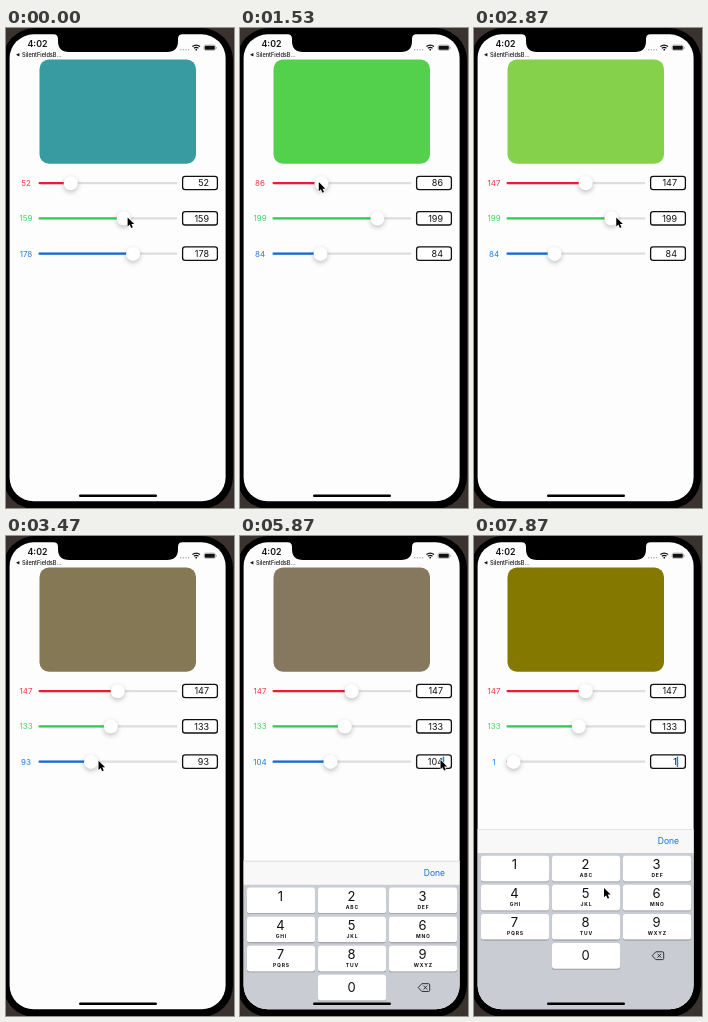
An HTML page with a canvas that plays this animation: 228x480 px, repeating every 8000 ms.

```html
<!DOCTYPE html>
<html lang="en">
<head>
<meta charset="utf-8">
<title>Colour sliders</title>
<style>
  html, body { margin: 0; width: 100%; height: 100%; overflow: hidden; background: #3a322e; }
  canvas { display: block; width: 100vw; height: 100vh; }
</style>
</head>
<body>
<canvas id="stage"></canvas>
<script>
const LOOP = 8000, W = 228, H = 480;
const INK = '#111';
const canvas = document.getElementById('stage');
const ctx = canvas.getContext('2d');
const ratio = window.devicePixelRatio || 1;
canvas.width = W * ratio;
canvas.height = H * ratio;

const red = { y: 155.1, value: 52, track: '#f01c30', label: '#ee3a49' };
const green = { y: 190.4, value: 159, track: '#36cc58', label: '#48d269' };
const blue = { y: 225.7, value: 178, track: '#106cdc', label: '#1f7fdc' };
const sliders = [red, green, blue];

// grip: how far right of the thumb's centre the pointer holds it
const drags = [
  { slider: green, start: 70, end: 270, to: 199, grip: 4 },
  { slider: blue, start: 400, end: 700, to: 84, grip: -0.5 },
  { slider: red, start: 1250, end: 2070, to: 151, grip: -2.7 },
  { slider: red, start: 2070, end: 2200, to: 147, grip: -2.7 },
  { slider: green, start: 2870, end: 3120, to: 133, grip: 5 },
  { slider: blue, start: 3310, end: 3665, to: 104, grip: 7.5 }
];
const deletions = [6930, 7400];
const KEYBOARD_START = 5660, KEYBOARD_TIME = 480;

const clamp01 = p => Math.min(1, Math.max(0, p));
const mix = (a, b, p) => a + (b - a) * p;
const thumbX = value => 39 + value * 0.4945;

function valueAt(slider, t) {
  let value = slider.value;
  for (const { slider: target, start, end, to } of drags) {
    if (target === slider) value = mix(value, to, clamp01((t - start) / (end - start)));
  }
  value = Math.round(value);
  if (slider === blue) {
    for (const time of deletions) if (t >= time) value = Math.floor(value / 10);
  }
  return value;
}

// The pointer settles shortly before each drag, then visits the field and the delete key.
const stops = drags.flatMap(({ slider, start, end, grip }) => {
  const stop = (time, at) => ({ time, x: thumbX(valueAt(slider, at)) + grip, y: slider.y - 1 });
  return [stop(start - 70, start), stop(start, start), stop(end, end)];
}).concat(
  { time: 4200, x: 200.5, y: 224 }, { time: 5950, x: 200.5, y: 224 },
  { time: 6530, x: 196, y: 429.5 }, { time: 7440, x: 196, y: 429.5 },
  { time: 7870, x: 130, y: 352 }
);

function pointerAt(t) {
  const next = stops.findIndex(stop => stop.time > t);
  if (next < 0) return stops[stops.length - 1];
  const a = stops[Math.max(0, next - 1)], b = stops[next];
  const p = clamp01((t - a.time) / (b.time - a.time));
  return { x: mix(a.x, b.x, p), y: mix(a.y, b.y, p) };
}

function swatchColor(t) {
  const [r, g, b] = sliders.map(slider => valueAt(slider, t));
  return `rgb(${Math.round(15 + r * 0.8)}, ${Math.round(g * 1.35 - 59.5)}, ${Math.round(b * 0.91)})`;
}

function box(x, y, w, h, r, fill, line, width) {
  ctx.beginPath();
  ctx.roundRect(x, y, w, h, r);
  if (fill) { ctx.fillStyle = fill; ctx.fill(); }
  if (line) { ctx.strokeStyle = line; ctx.lineWidth = width; ctx.stroke(); }
}

function write(text, x, y, size, color = INK, align = 'left', weight = 400, spacing = 0) {
  ctx.font = `${weight} ${size}px Inter, sans-serif`;
  ctx.letterSpacing = spacing + 'px';
  ctx.textAlign = align;
  ctx.fillStyle = color;
  ctx.fillText(text, x, y);
}

function strokePath(path, color, width) {
  ctx.strokeStyle = color;
  ctx.lineWidth = width;
  ctx.stroke(new Path2D(path));
}

function fillPath(path, color) {
  ctx.fillStyle = color;
  ctx.fill(new Path2D(path));
}

function drawStatus() {
  write('4:02', 21.5, 19, 8.8, INK, 'left', 600);
  fillPath('M10 26.8 L13.4 25 V28.6 Z', INK);
  write('SilentFieldsB...', 16, 28.8, 5.6, INK, 'left', 500);
  for (let i = 0; i < 4; i++) box(174 + i * 2.6, 21, 1.5, 1.5, 0.75, '#aaa');
  strokePath('M186.4 18.6 Q190.2 15.6 194 18.6 M187.9 20.2 Q190.2 18.4 192.5 20.2', INK, 1.3);
  box(189.4, 20.8, 1.7, 1.7, 0.85, INK);
  box(198, 17, 11.5, 5.4, 1.6, null, '#999', 0.6);
  box(198.7, 17.7, 10.1, 4, 1, INK);
  box(210.2, 18.9, 0.8, 1.8, 0.4, '#999');
}

function drawSlider(slider, t) {
  const { y, track, label } = slider;
  const value = valueAt(slider, t);
  const x = thumbX(value);
  write(value, 20, y + 3, 8, label, 'center');
  box(32.5, y - 1.1, 139, 2.2, 1.1, '#dedede');
  box(32.5, y - 1.1, x - 32.5, 2.2, 1.1, track);
  ctx.save();
  ctx.shadowColor = 'rgba(0, 0, 0, .25)';
  ctx.shadowBlur = 5 * ratio;
  ctx.shadowOffsetY = 2 * ratio;
  box(x - 7, y - 6.8, 14, 14, 7, '#fff');
  ctx.restore();
  box(176.6, y - 6.8, 34.8, 13.4, 2.6, '#fff', INK, 1.3);
  write(value, 203, y + 3.3, 9, INK, 'right');
}

function drawCaret(t) {
  const typing = t > deletions[0] - 230;
  const blinkOn = t >= 5730 && (t - 5730) % 1070 < 535;
  if (typing || blinkOn) box(202.7, 220.6, 1.5, 10.4, 0.5, '#2474dc');
}

function drawKey(index) {
  const zero = index === 9;
  const x = zero ? 78 : 7 + (index % 3) * 71;
  const y = 319.7 + Math.floor(index / 3) * 29.1;
  const letters = ['', 'ABC', 'DEF', 'GHI', 'JKL', 'MNO', 'PQRS', 'TUV', 'WXYZ', ''][index];
  box(x, y + 0.8, 68, 25.7, 2.6, '#8b8d92');
  box(x, y, 68, 25.7, 2.6, '#fff');
  write((index + 1) % 10, x + 33.5, y + (zero ? 17 : 13.5), 13, INK, 'center');
  write(letters, x + 34.4, y + 21.5, 5, INK, 'center', 700, 0.8);
}

function drawKeyboard(t) {
  const p = clamp01((t - KEYBOARD_START) / KEYBOARD_TIME);
  if (!p) return;
  ctx.save();
  ctx.translate(0, 181 * (1 - p) ** 3);
  box(0, 293, W, 24, 0, '#f8f8f9');
  box(0, 293, W, 0.6, 0, '#d4d4d6');
  write('Done', 205, 308.4, 8.5, '#1070d4', 'right');
  box(0, 317, W, 160, 0, '#c9ccd2');
  for (let i = 0; i < 10; i++) drawKey(i);
  strokePath('M178.2 419.7 L181.8 415.8 H188.5 Q189.7 415.8 189.7 417 V422.4 Q189.7 423.6 188.5 423.6 H181.8 Z'
    + ' M183.5 417.8 L187.2 421.6 M187.2 417.8 L183.5 421.6', '#222', 0.9);
  ctx.restore();
}

function drawPointer(t) {
  const { x, y } = pointerAt(t);
  const arrow = 'M0 0 V9.2 L2.1 7.2 L3.6 10.6 L5.2 9.9 L3.7 6.6 H6.6 Z';
  ctx.save();
  ctx.translate(x, y);
  ctx.lineJoin = 'round';
  strokePath(arrow, '#fff', 1.2);
  fillPath(arrow, '#000');
  ctx.restore();
}

function draw(t) {
  ctx.setTransform(ratio, 0, 0, ratio, 0, 0);
  box(0, 0, W, H, 0, '#3a322e');
  box(-3, 0, 230, 481, 32, '#000');

  ctx.save();
  box(3.6, 6.3, 216, 467, 24, '#fdfdfd');
  ctx.clip();
  drawStatus();
  box(33.5, 31.5, 156.5, 104.3, 9.5, swatchColor(t));
  sliders.forEach(slider => drawSlider(slider, t));
  drawCaret(t);
  drawKeyboard(t);
  box(73, 466.4, 78, 2.7, 1.35, '#000');
  ctx.restore();

  fillPath('M47 6 Q52 6 52 11 V13 Q52 24 63 24 H161 Q172 24 172 13 V11 Q172 6 177 6 Z', '#000');
  drawPointer(t);
}

function frame() {
  draw(performance.now() % LOOP);
  requestAnimationFrame(frame);
}
frame();
</script>
</body>
</html>
```
